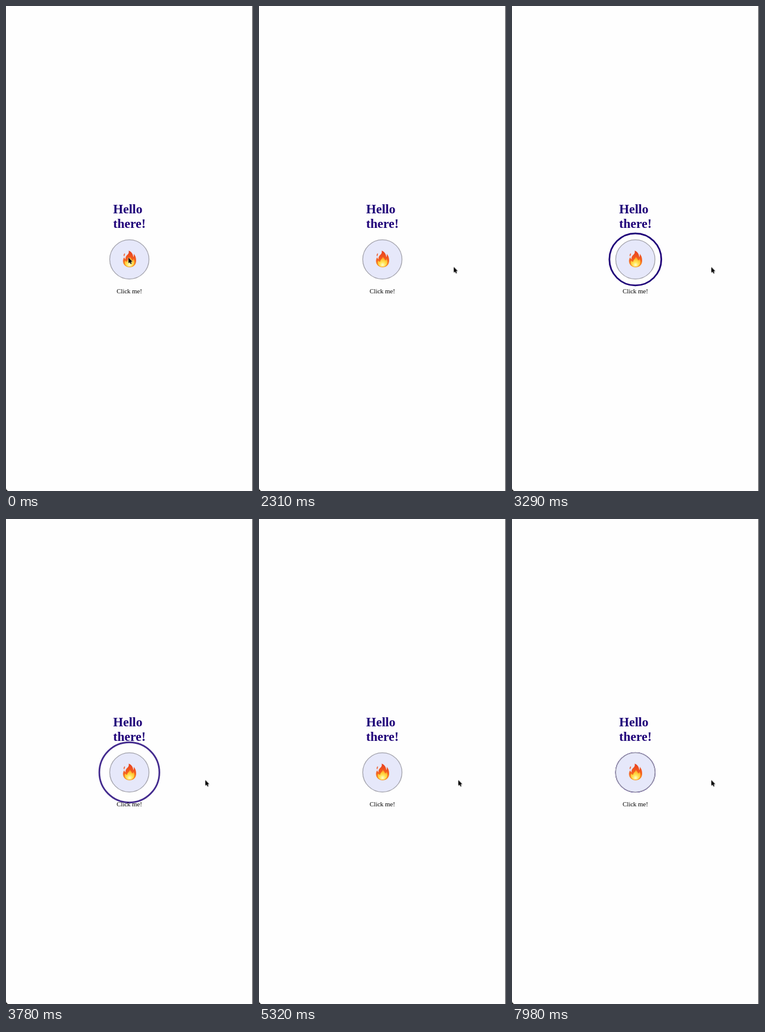
An HTML page that plays this animation: 408x800 px, repeating every 8000 ms.

```html
<!DOCTYPE html>
<html lang="en">
<head>
<meta charset="utf-8">
<title>Pulsing button</title>
<style>
  html, body { margin: 0; width: 100%; height: 100%; overflow: hidden; background: #fefefe; }
  svg { display: block; width: 100%; height: 100%; }
  text { font-family: "Liberation Serif", "Times New Roman", serif; }
  .title { font-size: 21.2px; font-weight: bold; fill: #1e0078; }
  .hint { font-size: 10.6px; fill: #000; }

  .ring {
    fill: none; stroke: #1e0078; stroke-width: 2.7;
    animation: grow 8s linear infinite, fade 8s linear infinite;
  }
  .button { fill: #e6e8fa; stroke: #a3a3ac; stroke-width: 1.3; }
  .cursor { animation: move 8s linear infinite; }

  @keyframes grow {
    0% { r: 31.6px; }
    32.625% { r: 31.6px; animation-timing-function: ease; }
    61% { r: 53.6px; }
    61.01%, 99.125% { r: 31.6px; }
    100% { r: 32.1px; }
  }
  @keyframes fade {
    0%, 32.6% { opacity: 0; }
    32.625% { opacity: 1; }
    45% { opacity: 1; animation-timing-function: ease; }
    61%, 99.1% { opacity: 0; }
    99.125%, 100% { opacity: 1; }
  }
  @keyframes move {
    0% { transform: translate(202.3px, 415px); }
    2.9% { transform: translate(202.3px, 415px); animation-timing-function: ease-in-out; }
    8.75% { transform: translate(277px, 428px); }
    10.5% { transform: translate(277px, 428px); animation-timing-function: ease-in-out; }
    14.9% { transform: translate(304px, 430px); }
    24.6% { transform: translate(304px, 430px); animation-timing-function: ease-in-out; }
    31.5%, 100% { transform: translate(329.2px, 430.6px); }
  }
</style>
</head>
<body>
<svg viewBox="0 0 408 800" preserveAspectRatio="none">
  <defs>
    <linearGradient id="outer" x1="0" y1="0" x2="0" y2="1">
      <stop offset="0" stop-color="#e8401f"/>
      <stop offset=".55" stop-color="#f4601f"/>
      <stop offset="1" stop-color="#f99a22"/>
    </linearGradient>
    <radialGradient id="inner" cx=".5" cy=".8" r=".75">
      <stop offset="0" stop-color="#fffbd0"/>
      <stop offset=".35" stop-color="#ffe75a"/>
      <stop offset=".75" stop-color="#ffc02e"/>
      <stop offset="1" stop-color="#fb8a24"/>
    </radialGradient>
  </defs>

  <!-- window edge -->
  <rect x="406.8" width="1.2" height="800" fill="#48484c"/>
  <path d="M0 795.5Q.5 799 3.5 800H0Z" fill="#111"/>

  <circle class="ring" cx="203.75" cy="418" r="31.6"/>

  <text class="title" x="177" y="342">Hello</text>
  <text class="title" x="177" y="366.4">there!</text>
  <text class="hint" x="182.7" y="474">Click me!</text>

  <circle class="button" cx="203.75" cy="418" r="32.4"/>

  <!-- flame -->
  <path fill="url(#outer)" d="M202.6 403.6C207 405 210 409.2 210.2 414.2C211.2 412.8 211.5 410.6 211.1 408.7C213.8 411.8 215.2 416 215 420.4C214.7 427 210.2 430.9 204.2 430.9C198 430.9 193.6 427 193.3 421.3C193.1 418.4 194.2 416.3 195.3 414.6C195.6 416.2 196.3 417.3 197.3 418C197.2 413.6 199 411.6 201.1 409.8C202.8 408.2 203.2 406 202.6 403.6Z"/>
  <path fill="#ee5a2c" d="M196.1 407.8C194.2 409.2 193.8 411.5 195.2 413.6C195.3 411.6 197.2 410.4 196.1 407.8Z"/>
  <path fill="url(#inner)" d="M204.4 413.8C207.4 416 207.2 418.2 208.7 419.8C209.8 419.2 210.2 418 210.4 416.8C212.2 419.3 212.6 421.9 211.8 424.6C210.7 428.2 207.8 430.1 204.2 430.1C199.8 430.1 196.5 427.5 196.1 423.7C195.9 422 196.4 420.7 197.1 419.7C197.9 421.2 199 421.9 200.2 421.9C200.1 418.7 203.7 417.4 204.4 413.8Z"/>

  <g class="cursor">
    <path d="M.3 1V10L2.6 8L4.2 11.4L6 10.5L4.4 7.2H7.2Z" fill="#000" opacity=".15"/>
    <path d="M0 0V9.3L2.1 7.4L3.5 10.6L5.2 9.9L3.8 6.8H6.6Z" fill="#000" stroke="#fff" stroke-width=".7" paint-order="stroke"/>
  </g>
</svg>
</body>
</html>
```
